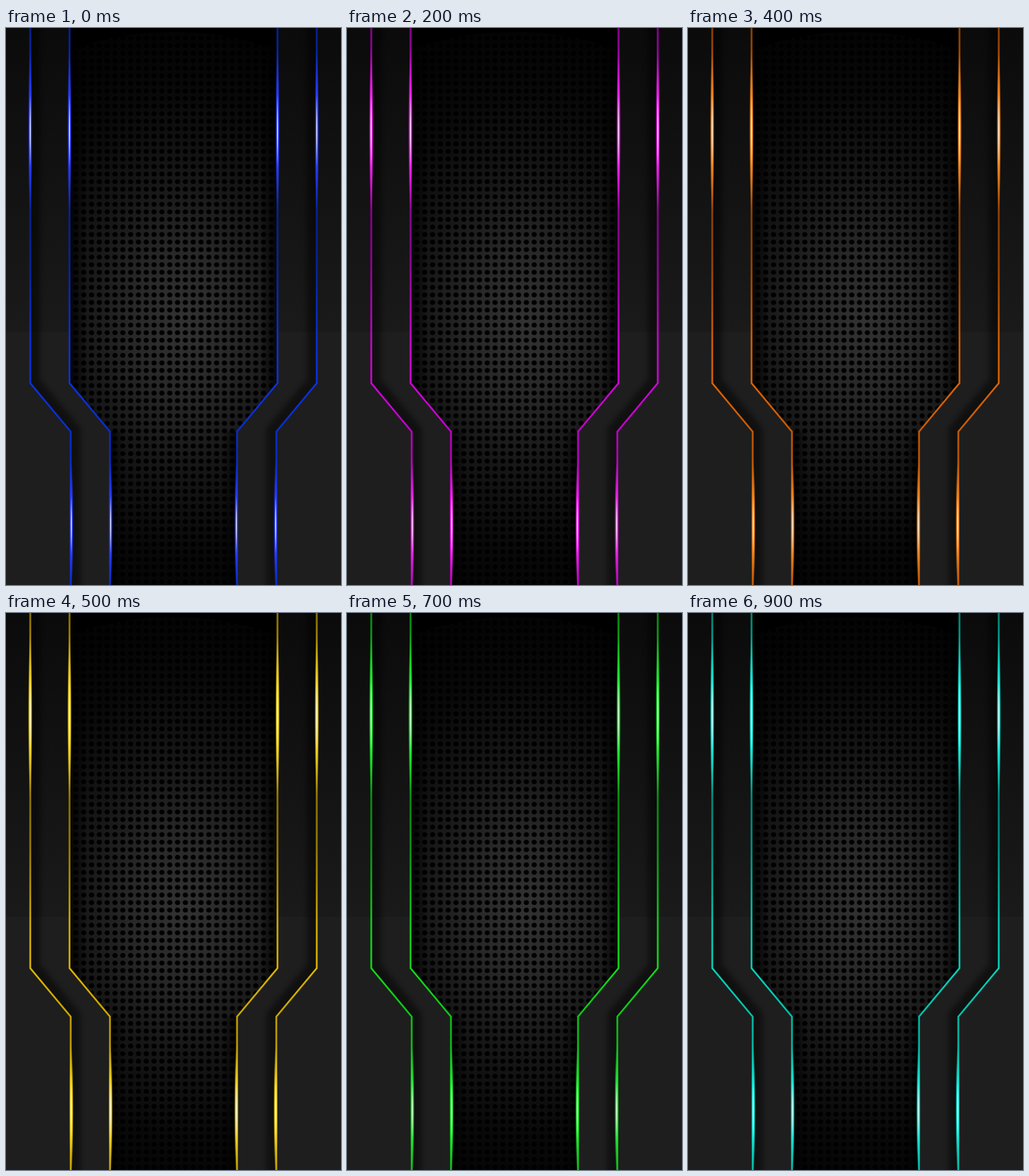
These frames come from a looping animation (580 px wide and 966 px high, 1000 ms). An HTML page:

```html
<!DOCTYPE html>
<html lang="en">
<head>
<meta charset="utf-8">
<title>Neon frame</title>
<style>
  html, body { margin: 0; width: 100%; height: 100%; overflow: hidden; background: #000; }
  svg { display: block; width: 100vw; height: 100vh; }
  .line { fill: none; stroke: currentColor; stroke-width: 3; }
  .dim { fill: none; stroke: url(#dim); stroke-width: 3.2; }
</style>
</head>
<body>
<svg id="stage" viewBox="0 0 580 966" preserveAspectRatio="none">
  <defs>
    <linearGradient id="panel" gradientUnits="userSpaceOnUse" x1="0" y1="0" x2="0" y2="966">
      <stop offset="0" stop-color="#0b0b0b"/>
      <stop offset=".3" stop-color="#131313"/>
      <stop offset=".5455" stop-color="#1a1a1a"/>
      <stop offset=".5455" stop-color="#1e1e1e"/>
    </linearGradient>
    <radialGradient id="light" gradientUnits="userSpaceOnUse" cx="0" cy="0" r="500"
        gradientTransform="translate(308 510) scale(.72 1)">
      <stop offset="0" stop-color="#323232"/>
      <stop offset=".25" stop-color="#282828"/>
      <stop offset=".5" stop-color="#171717"/>
      <stop offset=".8" stop-color="#090909"/>
      <stop offset="1" stop-color="#040404"/>
    </radialGradient>
    <linearGradient id="edge">
      <stop offset="0" stop-opacity=".75"/>
      <stop offset="1" stop-opacity="0"/>
    </linearGradient>
    <linearGradient id="dim" gradientUnits="userSpaceOnUse" x1="0" y1="0" x2="0" y2="966">
      <stop offset="0" stop-opacity=".38"/>
      <stop offset=".12" stop-opacity=".1"/>
      <stop offset=".24" stop-opacity=".1"/>
      <stop offset=".34" stop-opacity=".36"/>
      <stop offset=".42" stop-opacity=".32"/>
      <stop offset=".56" stop-opacity=".04"/>
      <stop offset=".64" stop-opacity="0"/>
      <stop offset=".76" stop-opacity=".14"/>
      <stop offset=".84" stop-opacity="0"/>
      <stop offset="1" stop-opacity=".1"/>
    </linearGradient>
    <radialGradient id="halo">
      <stop offset="0" stop-color="var(--glow)"/>
      <stop offset=".5" stop-color="var(--glow)" stop-opacity=".9"/>
      <stop offset="1" stop-color="var(--glow)" stop-opacity="0"/>
    </radialGradient>
    <radialGradient id="core">
      <stop offset="0" stop-color="#fff" stop-opacity=".95"/>
      <stop offset=".4" stop-color="#fff" stop-opacity=".7"/>
      <stop offset="1" stop-color="#fff" stop-opacity="0"/>
    </radialGradient>
    <pattern id="holes" patternUnits="userSpaceOnUse" x="114.23" y="10.95" width="13.54" height="13.1">
      <ellipse cx="6.77" cy="6.55" rx="4.6" ry="4.3"/>
    </pattern>
    <filter id="soft" filterUnits="userSpaceOnUse" x="0" y="-40" width="300" height="1050">
      <feGaussianBlur stdDeviation="5"/>
    </filter>
    <path id="rail" d="M42-40V616L112 700V1010"/>
    <clipPath id="strip"><path d="M42 0H110V616L180 700V966H112V700L42 616Z"/></clipPath>
    <clipPath id="middle"><path d="M110 0H470V616L400 700V966H180V700L110 616Z"/></clipPath>
    <g id="flare">
      <ellipse rx="3.8" ry="140" fill="url(#halo)"/>
      <ellipse rx="1.6" ry="68" fill="url(#core)"/>
    </g>
    <g id="beam">
      <use href="#rail" class="line"/>
      <use href="#rail" class="dim"/>
      <use href="#flare" x="41.9" y="178"/>
      <use href="#flare" transform="translate(113.2 862) scale(.95 .8)"/>
    </g>
    <g id="shade" clip-path="url(#strip)">
      <use href="#rail" fill="none" stroke="#000" stroke-width="34" opacity=".45" filter="url(#soft)"/>
    </g>
    <g id="side">
      <use href="#shade"/>
      <use href="#beam"/>
      <use href="#beam" x="68"/>
    </g>
    <path id="rim" d="M110 0H140V616L210 700V966H180V700L110 616Z" fill="url(#edge)"/>
  </defs>

  <rect width="580" height="966" fill="url(#panel)"/>
  <g clip-path="url(#middle)">
    <rect width="580" height="966" fill="url(#light)"/>
    <rect x="110" width="30" height="700" fill="url(#edge)"/>
    <rect x="110" width="30" height="700" fill="url(#edge)" transform="translate(580) scale(-1 1)"/>
    <rect x="180" y="700" width="24" height="266" fill="url(#edge)"/>
    <rect x="180" y="700" width="24" height="266" fill="url(#edge)" transform="translate(580) scale(-1 1)"/>
    <rect width="580" height="966" fill="url(#holes)"/>
    <path d="M110 0H470V38Q290-25 110 38Z"/>
  </g>
  <use href="#side"/>
  <use href="#side" transform="translate(580) scale(-1 1)"/>
</svg>
<script>
  // One [line, glow] pair per 100 ms step
  const colors = [
    ['#0a32e2', '#2a3cff'], ['#7410e0', '#9030ff'], ['#d402dc', '#f822f4'],
    ['#da0036', '#fa2048'], ['#da6204', '#f88a20'], ['#dcb400', '#f8d820'],
    ['#b8d800', '#ccf010'], ['#10d81a', '#20f030'], ['#04d47c', '#18f098'],
    ['#04d2b8', '#18ecdc']
  ];
  const style = document.getElementById('stage').style;

  function draw(now) {
    const [line, glow] = colors[Math.floor(now / 100) % colors.length];
    style.color = line;
    style.setProperty('--glow', glow);
    requestAnimationFrame(draw);
  }
  draw(performance.now());
</script>
</body>
</html>
```
